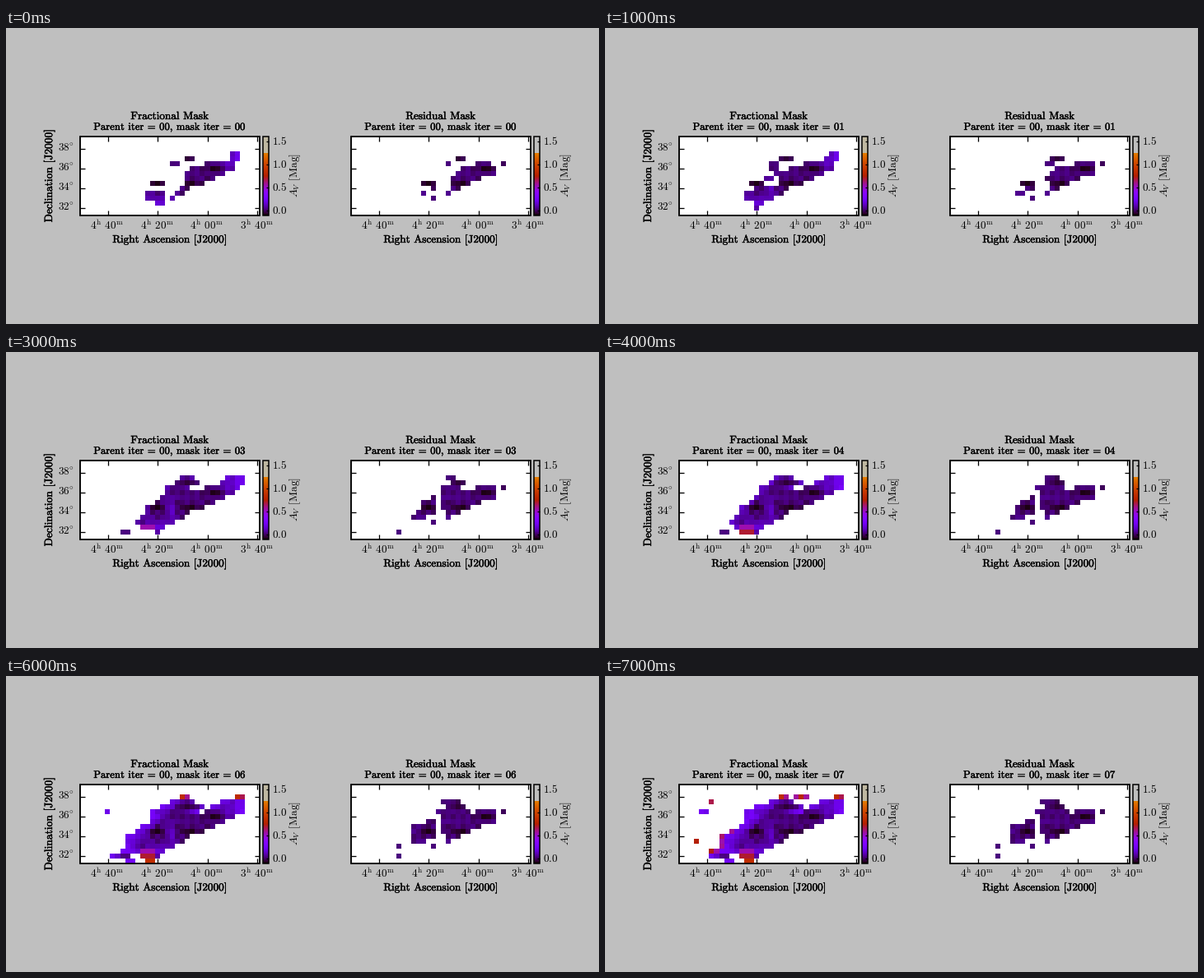
Write a matplotlib script that moves like this. It is 720 px wide and 360 px high and loops after 8 s.

```python
import numpy as np
import matplotlib.pyplot as plt
from matplotlib.animation import FuncAnimation
from matplotlib.patches import Rectangle
from matplotlib.patheffects import withStroke

plt.rcParams.update({"mathtext.fontset": "cm", "mathtext.default": "rm"})

W, H, DPI = 720, 360, 72
ROWS, COLS, STEPS = 16, 36, 8
TOP, HEIGHT, WIDTH = 132, 96, 218
LEFT_X, RIGHT_X = 90, 419


def grow(born, t0, t1, first, last=None):
    """Morph an outline of (row, left, right) points and note new cells."""
    first = np.array(first, float)
    last = first if last is None else np.array(last, float)
    for step in range(t0, t1 + 1):
        k = (step - t0) / max(t1 - t0, 1)
        rows, left, right = ((1 - k) * first + k * last).T
        for r in range(int(np.ceil(rows[0])), int(rows[-1]) + 1):
            a = int(np.round(np.interp(r, rows, left)))
            b = int(np.round(np.interp(r, rows, right)))
            span = born[r, a:b + 1]
            np.minimum(span, step, out=span)


def specks(born, step, cells):
    for r, c in cells:
        born[r, c] = min(born[r, c], step)


def fractional():
    born = np.full((ROWS, COLS), STEPS)
    # Core and the lower lobe.
    grow(born, 0, 1,
         [(6, 22, 30), (7, 21, 28), (9, 21, 24), (10, 20, 21), (12, 18, 18)],
         [(6, 22, 30), (7, 19, 28), (9, 20, 24), (10, 15, 21), (12, 13, 18)])
    grow(born, 0, 1, [(11, 13, 16), (12, 13, 16), (13, 15, 16)])
    # Body, spreading left.
    grow(born, 2, 7,
         [(5, 18, 20), (6, 18, 30), (9, 14, 24), (10, 14, 21), (12, 12, 18),
          (13, 15, 16)],
         [(5, 13, 24), (7, 13, 28), (9, 10, 24), (10, 8, 21), (12, 8, 18),
          (13, 6, 16)])
    # Crest, tail and the small knots.
    grow(born, 0, 5, [(4, 21, 22), (4, 21, 22)], [(2, 20, 21), (4, 17, 24)])
    grow(born, 0, 5, [(3, 30, 31), (4, 30, 31), (5, 25, 30)],
         [(2, 31, 32), (4, 26, 32), (5, 25, 32)])
    grow(born, 0, 1, [(5, 18, 19), (5, 18, 19)], [(5, 18, 19), (6, 18, 19)])
    grow(born, 0, 0, [(9, 14, 16)])
    grow(born, 3, 5, [(13, 12, 14), (13, 12, 14)], [(13, 12, 14), (15, 13, 14)])
    grow(born, 2, 6, [(14, 9, 9), (14, 9, 9)], [(14, 6, 9), (15, 9, 10)])
    specks(born, 1, [(14, 15), (8, 17), (8, 18)])
    specks(born, 6, [(5, 5), (4, 16)])
    specks(born, 7, [(3, 6), (5, 4), (11, 3), (4, 15)])
    grow(born, 7, 7, [(2, 23, 25)])
    return born


def residual():
    born = np.full((ROWS, COLS), STEPS)
    grow(born, 0, 3,
         [(6, 22, 28), (7, 21, 28), (8, 20, 25), (10, 20, 21), (11, 19, 19)],
         [(6, 18, 28), (7, 18, 28), (8, 18, 25), (10, 19, 21), (11, 19, 19)])
    grow(born, 0, 1, [(5, 25, 27)], [(5, 25, 28)])
    grow(born, 0, 5, [(5, 19, 19)], [(5, 17, 23)])
    crest = [(3, 20, 20), (4, 20, 22)]
    grow(born, 0, 2, [(4, 21, 22), (4, 21, 22)], crest)
    grow(born, 2, 5, crest, [(3, 18, 21), (4, 19, 22)])
    lobe = [(7, 16, 16), (8, 14, 16), (10, 13, 16), (11, 12, 14)]
    grow(born, 0, 3, [(9, 14, 16), (9, 14, 16), (10, 16, 16), (11, 14, 14)],
         lobe)
    grow(born, 3, 7, lobe,
         [(7, 15, 16), (8, 12, 16), (10, 12, 16), (11, 12, 14)])
    specks(born, 0, [(12, 16), (5, 30)])
    specks(born, 2, [(14, 9)])
    specks(born, 5, [(12, 9)])
    return born


row, col = np.mgrid[:ROWS, :COLS]


def bump(r, c, sr, sc):
    return np.exp(-((row - r) / sr) ** 2 - ((col - c) / sc) ** 2)


def gnuplot(x):
    x = np.clip(x, 0, 1)
    b = np.clip(np.sin(2 * np.pi * x), 0, 1)
    return np.stack([np.sqrt(x), x ** 3, b], axis=-1)


left_born, right_born = fractional(), residual()

# Dark knots in a purple core; violet tail, seam and late rim.
rng = np.random.default_rng(4)
core = (.075 + rng.uniform(-.022, .022, (ROWS, COLS))
        - .055 * bump(6, 26, .8, 1.6) - .045 * bump(9, 22, .9, 2)
        - .055 * bump(9, 15, .8, 1.4) - .035 * bump(4, 21, .8, 1))
glow = (.11 * bump(4, 31.5, 2.5, 3) + .08 * bump(9.5, 17.6, 2, .9)
        + .08 * bump(13, 15, 1.5, 3))
rim = .03 * np.clip(left_born - 2, 0, 4)
left_level = np.clip(core + glow + rim, .012, .22)
right_level = np.clip(core, .012, .1)

# The outermost late cells and the ember at the foot run hot.
hot = (left_born == 7) & ((row > 8) | (row < 4)) | (left_born >= 5) & (row == 2)
ember = (row > 12) & (abs(col - 13) < 2) & (left_born >= 3)
heat = rng.uniform(.36, .56, (ROWS, COLS))
left_level = np.where(hot, heat, left_level)
left_level = np.where(ember, .38 + .09 * (row - 13), left_level)

fig = plt.figure(figsize=(W / DPI, H / DPI), dpi=DPI, facecolor="#bfbfbf")
ax = fig.add_axes([0, 0, 1, 1])
ax.axis("off")


def tex(s):
    s = s.replace(" = ", r"\hspace{0.2}=\hspace{0.2}").replace(",", "{,}")
    return "$" + s.replace(" ", r"\hspace{0.4}") + "$"


def label(x, y, s, size=13.2, ha="center", va="baseline", **kw):
    return ax.text(x, y, tex(s), fontsize=size, ha=ha, va=va, **kw)


def heavy(*args, **kw):
    return label(*args, path_effects=[withStroke(linewidth=.4)], **kw)


def line(x0, y0, x1, y1):
    ax.plot([x0, x1], [y0, y1], color="k", lw=1.3, solid_capstyle="butt",
            zorder=4)


def box(x, w, face="none", z=5):
    ax.add_patch(Rectangle((x, TOP), w, HEIGHT, fc=face, ec="k", lw=1.5,
                           zorder=z))


def colorbar(x, cap):
    bar = gnuplot((np.arange(HEIGHT) + .5) / HEIGHT)[::-1, None]
    bar[:20] = cap
    ax.pcolormesh([x, x + 7], TOP + np.arange(HEIGHT + 1), bar, zorder=2)
    box(x, 7)
    for i in range(4):
        y = 222 - 28 * i
        line(x + 3.5, y, x + 7, y)
        label(x + 11, y + 4, f"{i / 2:.1f}", ha="left")
    label(x + 39, 179.5, r"\mathit{A_V} [Mag]", va="center", rotation=90)


def panel(x, title, cap):
    """Draw the fixed parts and return the cells and the counter line."""
    box(x, WIDTH, "white", 1)
    box(x, WIDTH)
    for i, s in enumerate(["4^h 40^m", "4^h 20^m", "4^h 00^m", "3^h 40^m"]):
        tx = x + 33.5 + 60.5 * i
        line(tx, TOP, tx, TOP + 6)
        line(tx, 222, tx, 228)
        label(tx - .5, 245, s)
    for i in range(4):
        y = 147 + 24 * i
        line(x, y, x + 6, y)
        line(x + WIDTH - 6, y, x + WIDTH, y)
    heavy(x + 109.5, 111, title)
    heavy(x + 109, 261, "Right Ascension [J2000]")
    colorbar(x + 222, cap)
    xs = np.round(x + .1 + WIDTH / COLS * np.arange(COLS + 1))
    ys = TOP + HEIGHT / ROWS * np.arange(ROWS + 1)
    cells = ax.pcolormesh(xs, ys, np.zeros((ROWS, COLS, 4)), zorder=3)
    return cells, heavy(x + 109, 124, "", size=12.7)


left_cells, left_count = panel(LEFT_X, "Fractional Mask", (.75, .72, .63))
right_cells, right_count = panel(RIGHT_X, "Residual Mask", (.745, .745, .74))
for i in range(4):
    label(83, 150.5 + 24 * i, rf"{38 - 2 * i}^{{\circ}}", ha="right")
heavy(53, 179.5, "Declination [J2000]", size=13.5, va="center", rotation=90)
ax.set_xlim(0, W)
ax.set_ylim(H, 0)


def rgba(level, mask):
    return np.dstack([gnuplot(level), mask.astype(float)])


def draw(step):
    left_cells.set_array(rgba(left_level, left_born <= step))
    right_cells.set_array(rgba(right_level, right_born <= step))
    text = tex(f"Parent iter = 00, mask iter = {step:02d}")
    left_count.set_text(text)
    right_count.set_text(text)
    return left_cells, right_cells, left_count, right_count


anim = FuncAnimation(fig, draw, frames=STEPS, interval=1000, repeat=True,
                     repeat_delay=0, blit=False)
plt.show()
```
